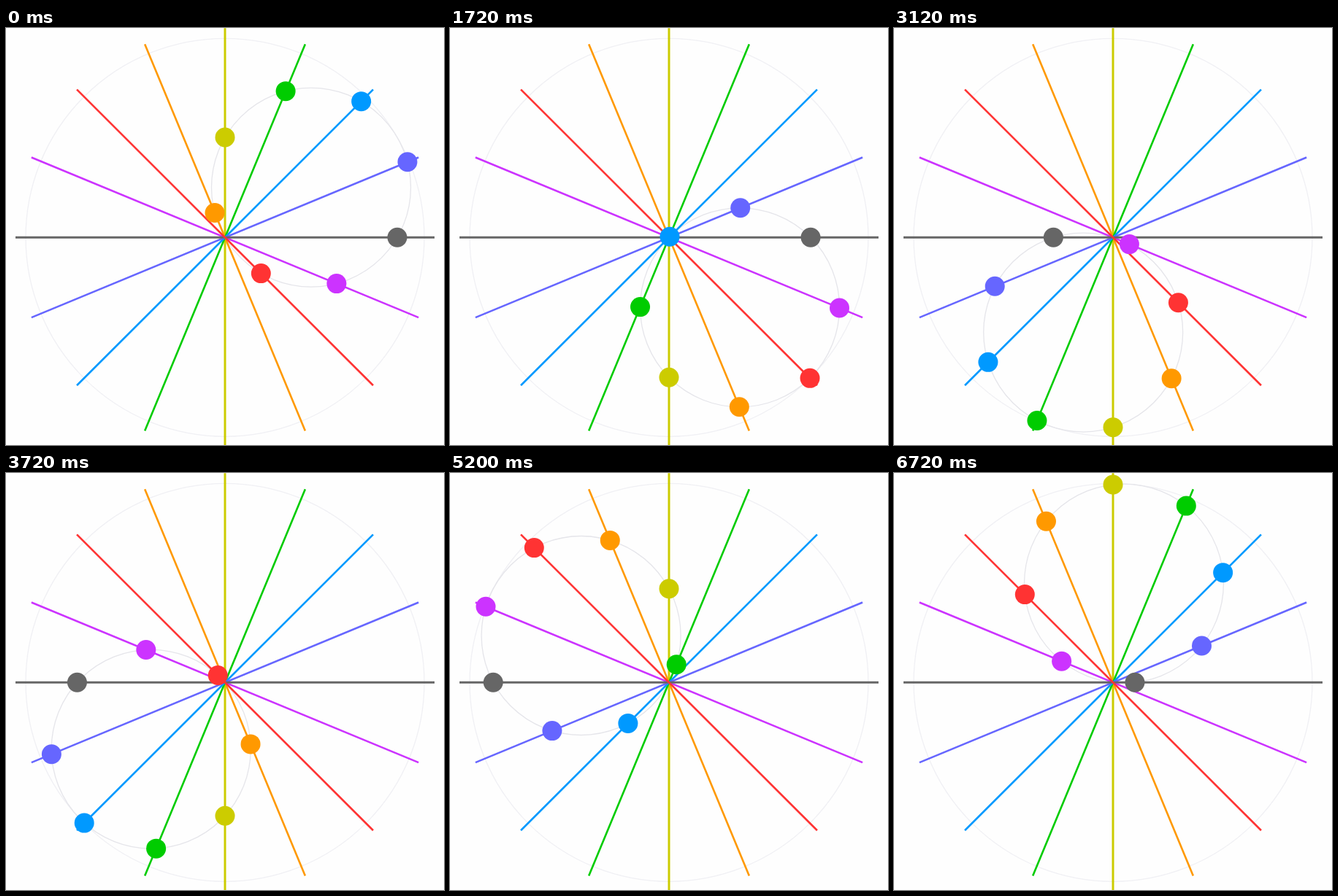
Animation, 600 px wide and 572 px high, one loop 6.76 s. Source, as an HTML page with a canvas:

```html
<!DOCTYPE html>
<html>
<head>
<meta charset="utf-8">
<style>
  html, body { margin: 0; width: 100%; height: 100%; overflow: hidden; background: #fefefe; }
  canvas { display: block; }
</style>
</head>
<body>
<canvas width="600" height="572"></canvas>
<script>
const ctx = document.querySelector("canvas").getContext("2d");
const CX = 300, CY = 287.3, R = 273, LINE = 287, DOT = 13.5;
const LOOP = 6760, TICK = 40, TICKS_PER_STEP = 1.583;
const RAD = Math.PI / 180;

// Diameters, 22.5 degrees apart, counted anticlockwise from the horizontal.
const colors = ["#666666", "#6666ff", "#0099ff", "#00cc00",
                "#cccc00", "#ff9900", "#ff3333", "#cc33ff"];
const drawOrder = [4, 5, 3, 2, 1, 7, 0, 6];

// [step, angle of the rolling circle in degrees]
const keys = [[0, 30.2], [12, 0.2], [27, -44.7], [49, -107.4],
              [69, -168.4], [82, -208.1], [106, -276.3]];

function rollAngle(step) {
  const i = Math.max(1, keys.findIndex(k => k[0] >= step));
  const [s0, a0] = keys[i - 1], [s1, a1] = keys[i];
  return a0 + (a1 - a0) * (step - s0) / (s1 - s0);
}

const point = (r, deg) => [CX + r * Math.cos(deg * RAD), CY - r * Math.sin(deg * RAD)];

function circle([x, y], r) {
  ctx.beginPath();
  ctx.arc(x, y, r, 0, 2 * Math.PI);
}

function ring(center, r, color) {
  circle(center, r);
  ctx.lineWidth = 1.3;
  ctx.strokeStyle = color;
  ctx.stroke();
}

function draw(time) {
  const tick = Math.floor(time % LOOP / TICK);
  const step = Math.min(106, Math.floor((tick + 0.46) / TICKS_PER_STEP));
  const roll = rollAngle(step);

  ctx.fillStyle = "#fefefe";
  ctx.fillRect(0, 0, 600, 572);
  ring([CX, CY], R, "#f0f0f4");
  ring(point(R / 2, roll), R / 2, "#e5e5ea");

  for (const i of drawOrder) {
    ctx.beginPath();
    ctx.moveTo(...point(LINE, i * 22.5));
    ctx.lineTo(...point(-LINE, i * 22.5));
    ctx.lineWidth = i % 4 ? 2.6 : 3;
    ctx.strokeStyle = colors[i];
    ctx.stroke();
  }

  // Each dot only slides along its own diameter.
  colors.forEach((color, i) => {
    const angle = i * 22.5;
    circle(point(R * Math.cos((roll - angle) * RAD), angle), DOT);
    ctx.fillStyle = color;
    ctx.fill();
  });
}

const start = performance.now();
function loop() {
  draw(performance.now() - start);
  requestAnimationFrame(loop);
}
loop();
</script>
</body>
</html>
```
